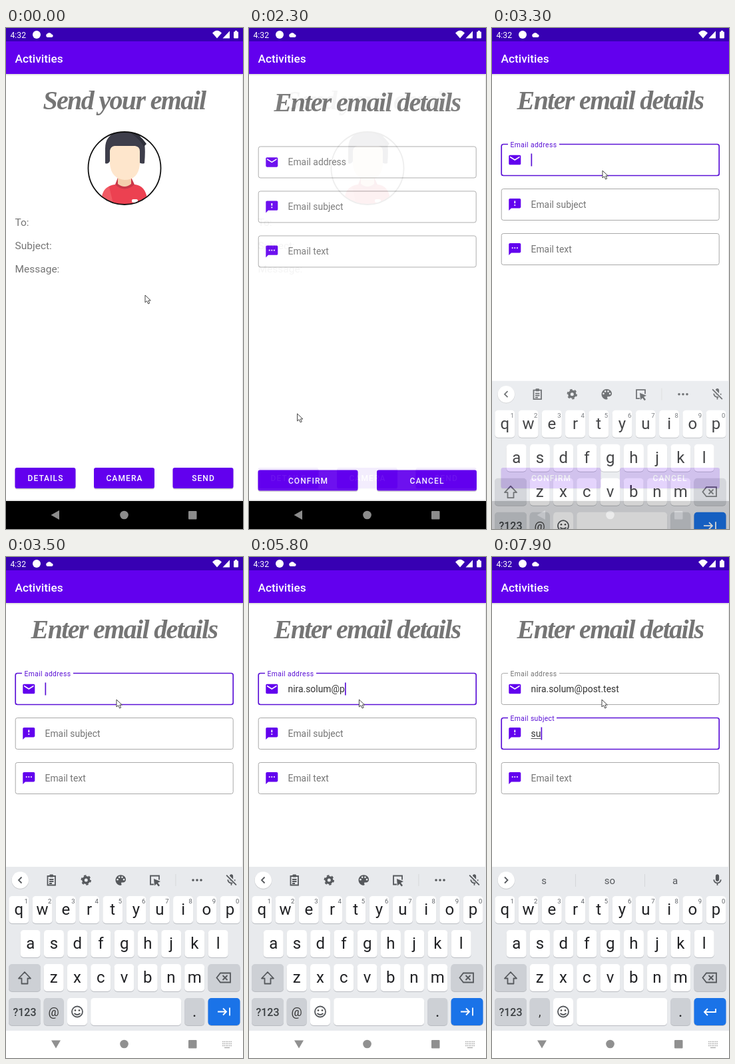
Recreate the animation shown at these times as an HTML page. Size 356x752 px, loop 8 s.

```html
<!DOCTYPE html>
<html lang="en">
<head>
<meta charset="utf-8">
<title>Email composer</title>
<style>
  html, body { margin: 0; width: 100%; height: 100%; overflow: hidden; background: #fff; }
  svg { display: block; width: 100%; height: 100%; }
  text { font-family: Roboto, Arial, sans-serif; }
  .title { font: italic bold 40px "Liberation Serif", "Times New Roman", serif; letter-spacing: -1.65px; fill: #757575; }
  .mid { text-anchor: middle; }
  .button { font-size: 12px; font-weight: 500; letter-spacing: 1.08px; fill: #fff; }
  .body { font-size: 15.5px; fill: #757575; }
  .input { font-size: 13.9px; fill: #333; }
  .key { font-size: 24px; fill: #202124; }
  .line { fill: none; stroke: #55585c; stroke-width: 1.8; }
</style>
</head>
<body>
<svg id="stage" viewBox="0 0 356 752"></svg>
<script>
const LOOP = 8000;
const PURPLE = '#6200ee';
const FOCUS_INK = '#5b12d6';
const EMAIL = 'nira.solum@post.test';
const SUBJECT = 'su';
const stage = document.getElementById('stage');

const rect = (x, y, w, h, fill, r = 0, extra = '') =>
  `<rect x="${x}" y="${y}" width="${w}" height="${h}" rx="${r}" fill="${fill}" ${extra}/>`;
const circle = (x, y, r, fill, extra = '') =>
  `<circle cx="${x}" cy="${y}" r="${r}" fill="${fill}" ${extra}/>`;
const path = (d, fill, extra = '') => `<path d="${d}" fill="${fill}" ${extra}/>`;
const line = (d, extra = '') => `<path class="line" d="${d}" ${extra}/>`;
const label = (x, y, s, cls, extra = '') => `<text x="${x}" y="${y}" class="${cls}" ${extra}>${s}</text>`;
const group = (id, inner, extra = '') => `<g id="${id}" ${extra}>${inner}</g>`;
// 24-unit icon centred on a point
const icon = (x, y, inner, scale = 0.866) =>
  `<g transform="translate(${x - 12 * scale} ${y - 12 * scale}) scale(${scale})">${inner}</g>`;

function button(x, w, caption, id = '') {
  return rect(x, 661.5, w, 31, '#000', 3, 'opacity=".2"') +
    rect(x, 660, w, 31, PURPLE, 3, id && `id="${id}"`) +
    (id ? circle(45, 680, 0, '#fff', 'id="ripple" opacity="0" clip-path="url(#detailsClip)"') : '') +
    label(x + w / 2 + 0.5, 680.3, caption, 'button mid');
}

function statusBar() {
  return rect(0, 0, 356, 20, '#3700b3') + rect(0, 20, 356, 49, PURPLE) +
    rect(0, 69, 356, 2, '#000', 0, 'opacity=".1"') +
    label(6.5, 15, '4:32', '', 'font-size="12.2" fill="#fff"') +
    circle(46, 10, 6, '#fff') +
    path('M62 14a3 3 0 0 1 0-5.5a4 4 0 0 1 6.6 1a2.3 2.3 0 0 1 .4 4.5z', '#fff') +
    path('M310 7.5Q317-.2 324 7.5L317 15.5Z M336 4.5V15.5H325.5Z', '#fff') +
    rect(342, 5.5, 7, 10, '#fff', 1) + rect(344, 4, 3, 2, '#fff') +
    label(13.5, 51.7, 'Activities', '', 'font-size="17.3" font-weight="500" fill="#fff"');
}

function avatar() {
  return circle(178, 210.5, 54.5, '#fff') + `<g clip-path="url(#avatarClip)">` +
    path('M149 203V181Q149 160 169 156Q196 151 203 165Q211 168 208 203Q202 205 199 200L156 200Q153 205 149 203Z', '#3e3e4b') +
    path('M188 158Q200 158 211 174L207 178Q202 168 188 158Z', '#2f303b') +
    path('M143 268Q143 237 163 235H194Q213 237 213 268Z', '#ec4151') +
    path('M143 268Q142 242 155 238L162 268Z', '#f15a64') +
    path('M164 235Q178 248 193 235L187 222H169Z', '#c93748') +
    path('M168 218H188V234Q178 242 168 234Z', '#f4cfad') +
    path('M156 184Q157 178 163 177H194Q201 178 201 185V204Q199 228 178 228Q158 226 156 204Z', '#fee6cc') +
    rect(189, 257, 9, 5, '#fff', 2) + '</g>' +
    circle(178, 210.5, 54.5, 'none', 'stroke="#111" stroke-width="1.8"');
}

const home = label(177.5, 121.5, 'Send your email', 'title mid') + avatar() +
  ['To:', 'Subject:', 'Message:'].map((s, i) => label(13.5, 297 + 35 * i, s, 'body')).join('') +
  button(13.5, 91, 'DETAILS', 'details') + button(132, 91, 'CAMERA') + button(250.5, 91, 'SEND');

const bubble = 'M20 2H4c-1.1 0-2 .9-2 2v18l4-4h14c1.1 0 2-.9 2-2V4c0-1.1-.9-2-2-2z';
const fields = [
  ['Email address', 174, 77, 'M20 4H4c-1.1 0-2 .9-2 2v12c0 1.1.9 2 2 2h16c1.1 0 2-.9 2-2V6c0-1.1-.9-2-2-2zm0 4l-8 5-8-5V6l8 5 8-5v2z'],
  ['Email subject', 241, 73, bubble + 'm-7 12h-2v-2h2v2zm0-4h-2V6h2v4z'],
  ['Email text', 308, 55, bubble + 'M9 11H7V9h2v2zm4 0h-2V9h2v2zm4 0h-2V9h2v2z'],
];

function field([name, y, notch, glyph], i) {
  return rect(14.2, y + 0.5, 327, 47, '#fff', 3, `id="box${i}"`) +
    rect(24, y - 3, notch, 8, '#fff', 0, `id="notch${i}"`) +
    icon(34.3, y + 24, path(glyph, PURPLE), 0.9) +
    label(58.5, y + 29, name, '', `id="name${i}"`) +
    label(58.5, y + 29.3, '', 'input', `id="value${i}"`) +
    rect(58.5, y + 31, 0, 1, '#555', 0, `id="under${i}"`) +
    rect(58.5, y + 14.5, 1.7, 19, FOCUS_INK, 0, `id="caret${i}"`);
}

const form = rect(0, 71, 356, 637, '#fff') + label(177.5, 121.5, 'Enter email details', 'title mid') +
  fields.map(field).join('') + button(13.5, 150, 'CONFIRM') + button(192, 150, 'CANCEL');

function navBar(color, back) {
  return path(back, color) + circle(177.5, 731, 6.3, color) + rect(274, 725, 12.5, 12.5, color, 1);
}

function keyboard() {
  const cap = (x, y, w, fill = '#fff') =>
    rect(x, y + 1, w, 41, '#b9bcc1', 5) + rect(x, y, w, 41, fill, 5);
  const PITCH = 35.25, GREY = '#cdd0d5';
  let keys = '';
  [['qwertyuiop', 19.3, 509], ['asdfghjkl', 36.7, 560], ['zxcvbnm', 71.7, 611]].forEach(([row, x0, y]) =>
    [...row].forEach((ch, i) => {
      const x = x0 + i * PITCH;
      keys += cap(x - 15, y, 30) + label(x, y + 28.2, ch, 'key mid');
      if (y === 509) keys += label(x + 11, y + 11, (i + 1) % 10, 'mid', 'font-size="9.5" fill="#5f6368"');
    }));
  keys += cap(4, 611, 48, GREY) + line('M28 623l-9 9.5h4.5v8h9v-8h4.5z', 'stroke-linejoin="round"') +
    cap(303.5, 611, 48, GREY) + line('M322 624.5h15v14h-15l-5.5-7zM325.5 628l7 7m0-7l-7 7') +
    cap(4, 662, 48, GREY) + label(28, 688.5, '?123', 'mid', 'font-size="16" font-weight="500" fill="#3c4043"') +
    cap(56.7, 662, 30, GREY) + label(71.7, 689, '@', 'mid', 'id="symbol" font-size="18" fill="#333"') +
    cap(92, 662, 30) + circle(107, 682.5, 8, 'none', 'class="line"') +
    circle(104, 680.5, 1.3, '#444') + circle(110, 680.5, 1.3, '#444') + line('M102.5 685q4.5 4 9 0') +
    cap(127.2, 662, 136) + cap(268.2, 662, 30, GREY) + label(283.2, 690, '.', 'key mid') +
    cap(303.5, 662, 48, '#1a73e8') +
    line('M318 682.5h13m-5-5l5 5l-5 5M336 676.5v12', 'id="tabKey" style="stroke:#fff"') +
    line('M336 678v5h-17m5-5l-5 5l5 5', 'id="returnKey" style="stroke:#fff"');

  const INK = '#55585c';
  const tools =
    line('M62.5 479h11.5v13.5h-11.5zM65 484h6.5m-6.5 3h6.5m-6.5 3h4') + rect(65.5, 476.5, 5.5, 4, INK, 1) +
    circle(120.3, 485, 4.3, 'none', `stroke="${INK}" stroke-width="3.6"`) +
    circle(120.3, 485, 6.7, 'none', `stroke="${INK}" stroke-width="2" stroke-dasharray="3.5"`) +
    icon(172.3, 485, path('M12 3c-5 0-9 4-9 9s4 9 9 9c.8 0 1.5-.7 1.5-1.5 0-.9-.8-1.1-.8-2 0-.8.7-1.5 1.5-1.5H16c2.8 0 5-2.2 5-5 0-4.4-4-8-9-8z', INK) +
      [[6.5, 11], [9.5, 7], [14.5, 7], [17.5, 11]].map(([x, y]) => circle(x, y, 1.5, '#e8eaed')).join('')) +
    line('M222 491.5h-5v-13h13v6') + path('M222 483l10 4l-4 2l3 4l-2 1.5l-3-4l-3 3z', INK) +
    rect(254.5, 476, 0.8, 18, '#d3d5d8') +
    [281, 287, 293].map(x => circle(x, 485, 1.8, INK)).join('');
  const words = [78, 177, 275].map((x, i) =>
    label(x, 490.5, '', 'mid', `id="word${i}" font-size="15" fill="#55585c"`)).join('') +
    group('dividers', rect(125, 476, 0.8, 19, '#d0d2d5') + rect(229, 476, 0.8, 19, '#d0d2d5'));
  const mic = 'M12 14c1.7 0 3-1.3 3-3V5c0-1.7-1.3-3-3-3S9 3.3 9 5v6c0 1.7 1.3 3 3 3zm5-3c0 2.8-2.2 5-5 5s-5-2.2-5-5H5c0 3.5 2.6 6.4 6 6.9V21h2v-3.1c3.4-.5 6-3.4 6-6.9h-2z';
  return rect(0, 465, 356, 246, '#e8eaed') + rect(0, 711, 356, 41, '#fff') +
    circle(21.3, 485.7, 13, '#c8cacd') + circle(21.3, 485, 12.7, '#fff') +
    line('', 'id="chevron"') + group('tools', tools) + group('words', words) +
    icon(338.5, 485, path(mic, INK) +
      group('micOff', '<path d="M4 3L21 20" stroke="#e8eaed" stroke-width="5"/><path d="M3.5 3.5L20.5 20.5" stroke="#55585c" stroke-width="2"/>')) +
    keys + navBar('#909090', 'M68 725.5H82L75 737.5Z') +
    line('M325 727.5h14m-14 3h14m-14 3h14', 'stroke-dasharray="1.5 1" style="stroke:#aaa;stroke-width:1.5"') +
    line('M328 736.5h8', 'style="stroke:#aaa;stroke-width:1.3"');
}

stage.innerHTML =
  `<defs><clipPath id="avatarClip"><circle cx="178" cy="210.5" r="54.5"/></clipPath>
   <clipPath id="detailsClip">${rect(13.5, 660, 91, 31, '#000', 3)}</clipPath></defs>` +
  rect(0, 0, 356, 752, '#fff') + group('home', home) + group('form', form) + statusBar() +
  rect(355, 71, 1, 639, '#e4e4e4') + rect(0, 708, 356, 2, '#ededed') + rect(0, 710, 356, 42, '#000') +
  navBar('#8c8c8c', 'M67.5 731L80 724V738Z') + group('keyboard', keyboard()) +
  path('M0 0V11L2.7 8.7L4.7 13L6.7 12L4.8 8H8.3Z', '#fff',
    'id="pointer" stroke="#444" stroke-width="1" stroke-linejoin="round"');

const ui = {};
stage.querySelectorAll('[id]').forEach(el => { ui[el.id] = el; });
const set = (id, attrs) => { for (const k in attrs) ui[id].setAttribute(k, attrs[k]); };
const show = (id, on) => set(id, { visibility: on ? 'visible' : 'hidden' });
const clamp = v => Math.max(0, Math.min(1, v));
const span = (t, a, b) => clamp((t - a) / (b - a));
const easeOut = k => 1 - (1 - k) ** 2;
const smooth = k => k * k * (3 - 2 * k);

// the third field is never focused within one loop
const FOCUS = [3100, 7000, 2 * LOOP];
const keyTime = [
  k => k === 0 ? 4250 : 4450 + (k - 1) * 130,
  k => 7550 + k * 250,
];
const typedAt = (i, t) => [EMAIL, SUBJECT][i].split('').filter((_, k) => t >= keyTime[i](k)).join('');

// time, x, y of the pointer tip
const route = [[0, 209, 401], [900, 203, 408], [1200, 196, 423], [1650, 45, 679], [2150, 45, 679],
  [2650, 171, 221], [2750, 171, 221], [3000, 166, 214], [LOOP, 165, 214]];

function movePointer(t) {
  const i = route.findIndex((p, n) => n && t < p[0]);
  const [a, b] = [route[i - 1], route[i]];
  const k = smooth(span(t, a[0], b[0]));
  set('pointer', { transform: `translate(${a[1] + (b[1] - a[1]) * k} ${a[2] + (b[2] - a[2]) * k})` });
}

function updateField(i, t) {
  const y = fields[i][1];
  const focused = t >= FOCUS[i] && !(t >= FOCUS[i + 1]);
  const lift = easeOut(span(t, FOCUS[i], FOCUS[i] + 150));
  const text = i < 2 ? typedAt(i, t) : '';
  set('box' + i, { stroke: focused ? FOCUS_INK : '#a0a0a0', 'stroke-width': focused ? 1.7 : 0.9 });
  show('notch' + i, lift > 0.5);
  set('name' + i, {
    x: 58.5 - 31 * lift, y: y + 29 - 24.5 * lift,
    'font-size': 13.9 - 3.5 * lift, 'letter-spacing': 0.35 * lift,
    fill: focused ? FOCUS_INK : '#757575',
  });
  ui['value' + i].textContent = text;
  const width = text ? ui['value' + i].getComputedTextLength() : 0;
  const composing = focused && text && !text.includes('.');
  set('under' + i, { width: composing ? width : 0 });
  const last = text ? keyTime[i](text.length - 1) : FOCUS[i];
  show('caret' + i, focused && (t - last) % 1000 < 500);
  set('caret' + i, { x: 58.5 + width + (text ? 0.2 : 0) });
  return composing ? text : '';
}

function updateKeyboard(t, composing) {
  const rise = easeOut(span(t, 3150, 3460));
  set('keyboard', { transform: `translate(0 ${246 * (1 - rise)})`, opacity: rise ** 0.6 });
  const onSubject = t >= FOCUS[1];
  const words = onSubject ? ['s', 'so', 'a'] : ['', composing.slice(0, -1) || composing, ''];
  words.forEach((w, i) => { ui['word' + i].textContent = w; });
  const suggest = composing !== '';
  show('tools', !suggest);
  show('words', suggest);
  show('dividers', suggest && onSubject);
  show('micOff', !onSubject);
  show('tabKey', !onSubject);
  show('returnKey', onSubject);
  ui.symbol.textContent = onSubject ? ',' : '@';
  set('chevron', { d: suggest ? 'M19 480.5l4.5 4.5l-4.5 4.5' : 'M23.5 480.5l-4.5 4.5l4.5 4.5' });
}

function render(t) {
  const open = easeOut(span(t, 2080, 2380));
  set('form', { opacity: open, transform: `translate(0 ${50 * (1 - open)})` });
  show('home', open < 1);
  const press = span(t, 1700, 1860);
  set('details', { fill: t >= 1700 && t < 2200 ? '#7525f0' : PURPLE });
  set('ripple', { r: 75 * easeOut(press), opacity: press ? 0.12 * (1 - span(t, 2000, 2250)) : 0 });
  const composing = [0, 1, 2].map(i => updateField(i, t)).join('');
  updateKeyboard(t, composing);
  movePointer(t);
}

const start = performance.now();
function tick() {
  render((performance.now() - start) % LOOP);
  requestAnimationFrame(tick);
}
tick();
</script>
</body>
</html>
```
